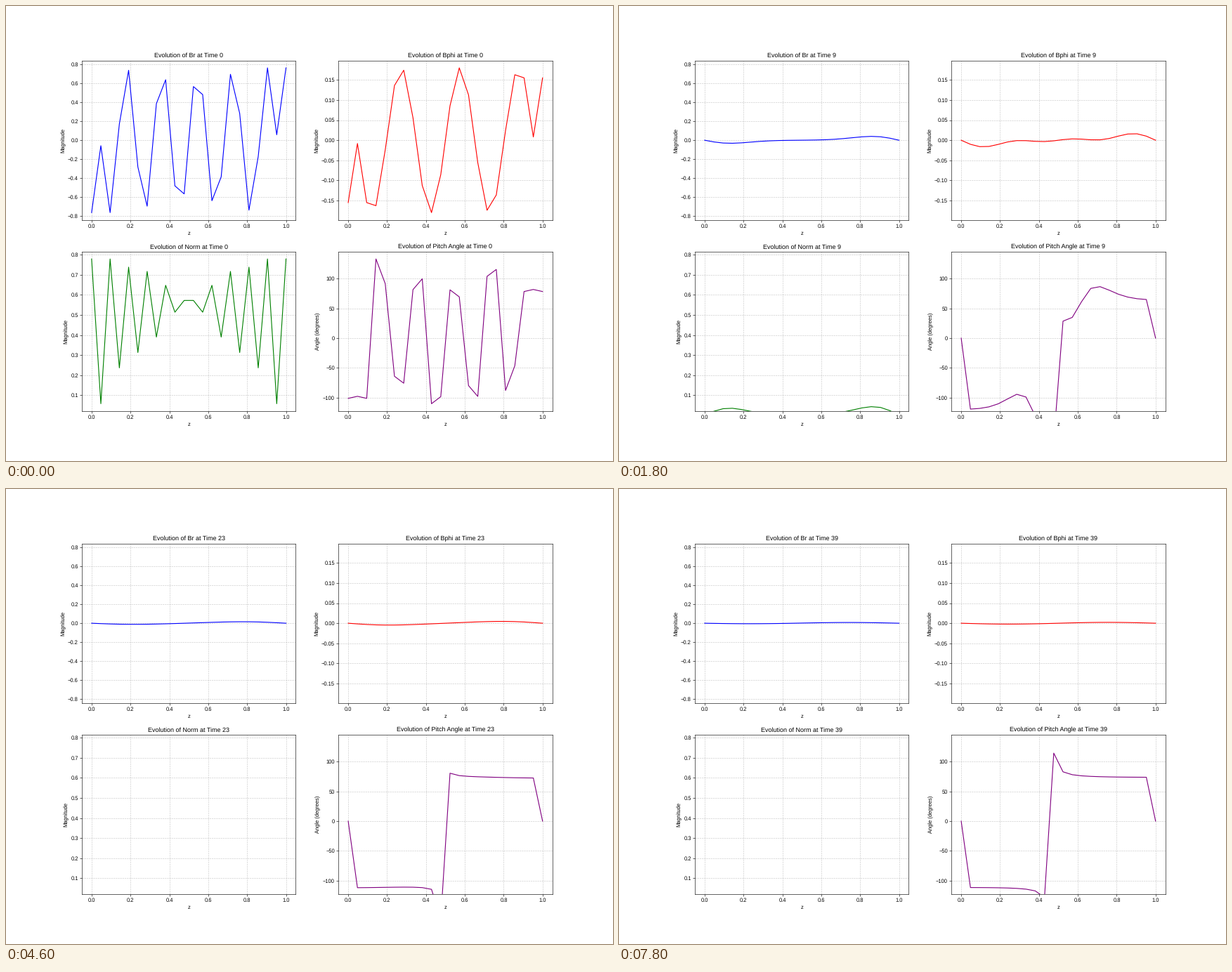
These frames come from a looping animation (864x648 px, 8000 ms). A matplotlib script:

```python
import numpy as np
import matplotlib.pyplot as plt
from matplotlib.animation import FuncAnimation

plt.rcParams["font.family"] = "Liberation Sans"
plt.rcParams["text.hinting"] = "none"

N = 22          # grid points, both ends included
STEPS = 40
R = 0.5         # diffusion number: eta * dt / dz^2
KICK = 0.066    # total of a short-lived source in Br
KICK_AT = 18
KICK_DECAY = 0.35

z = np.linspace(0, 1, N)
u = np.pi * 2.2 * (z - 0.5)


def start(amp, k):
    """Sine wave whose end points mirror their second neighbours."""
    b = amp * np.sin(k * u)
    b[0], b[-1] = b[2], b[-3]
    return b


# Crank-Nicolson matrices; the ends are held at zero
lap = -2 * np.eye(N) + np.eye(N, k=1) + np.eye(N, k=-1)
implicit = np.eye(N) - R / 2 * lap
explicit = np.eye(N) + R / 2 * lap
for row in (0, -1):
    implicit[row] = 0
    implicit[row, row] = 1
    explicit[row] = 0


def evolve():
    br, bphi = start(0.772, 5), start(0.1806, 3)
    states = [(br, bphi)]
    for n in range(STEPS - 1):
        rhs = explicit @ br
        rhs[KICK_AT] += KICK * (1 - KICK_DECAY) * KICK_DECAY ** n
        br = np.linalg.solve(implicit, rhs)
        bphi = np.linalg.solve(implicit, explicit @ bphi)
        br[[0, -1]] = 0
        bphi[[0, -1]] = 0
        states.append((br, bphi))
    return states


def curves(br, bphi):
    return br, bphi, np.hypot(br, bphi), np.degrees(np.arctan2(br, bphi))


history = [curves(*state) for state in evolve()]

panels = [
    ("Br", "Magnitude", "blue"),
    ("Bphi", "Magnitude", "red"),
    ("Norm", "Magnitude", "green"),
    ("Pitch Angle", "Angle (degrees)", "purple"),
]

fig, axes = plt.subplots(2, 2, figsize=(16, 12), dpi=54)
lines, titles = [], []
for ax, (name, ylabel, color), y in zip(axes.flat, panels, history[0]):
    lines.append(ax.plot(z, y, color=color)[0])
    titles.append(ax.set_title(f"Evolution of {name} at Time 0"))
    ax.set_xlabel("z")
    ax.set_ylabel(ylabel)
    ax.grid(True, linestyle="--", alpha=0.7)
    # keep the limits fitted to the first state
    ax.set_xlim(ax.get_xlim())
    ax.set_ylim(ax.get_ylim())


def update(t):
    for line, title, (name, _, _), y in zip(lines, titles, panels, history[t]):
        line.set_ydata(y)
        title.set_text(f"Evolution of {name} at Time {t}")
    return lines + titles


anim = FuncAnimation(fig, update, frames=STEPS, interval=200,
                     init_func=lambda: update(0), repeat=True, repeat_delay=0)
plt.show()
```
